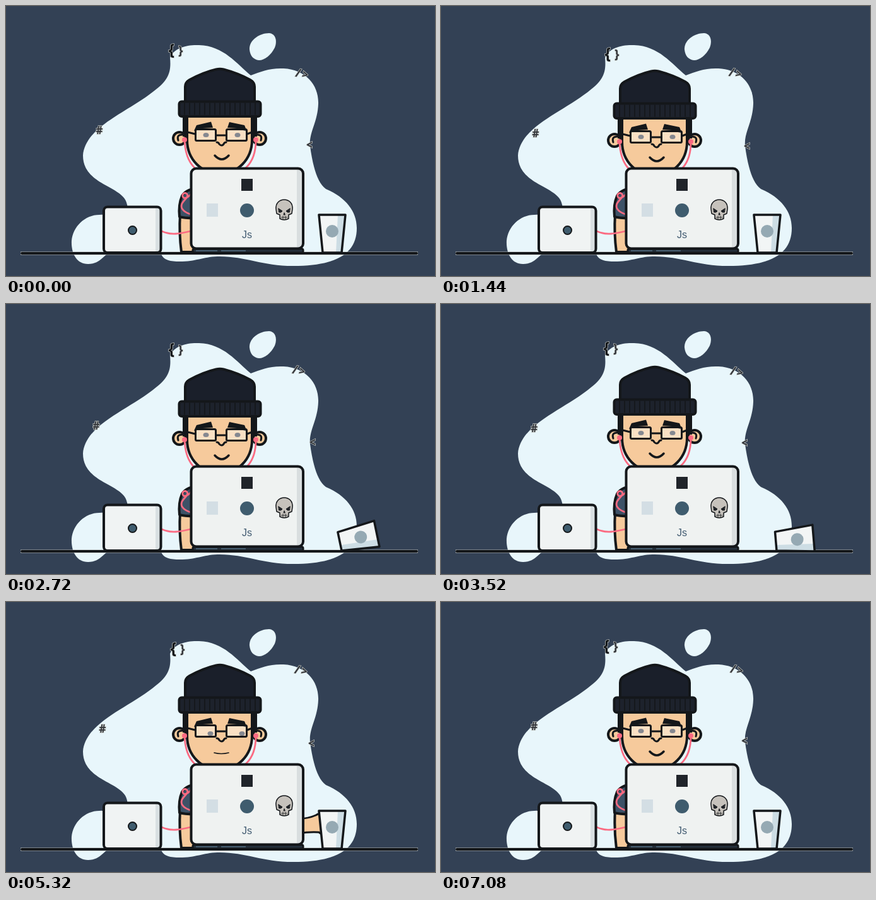
Recreate the animation shown at these times as an HTML page. Size 680 by 428 pixels, loop 7120 ms.

```html
<!DOCTYPE html>
<html lang="en">
<head>
<meta charset="utf-8">
<title>Developer at a desk</title>
<style>
  html, body { margin: 0; width: 100%; height: 100%; overflow: hidden; background: #334155; }
  svg { display: block; width: 680px; height: 428px; }
  .ink { stroke: #14171a; stroke-width: 4; stroke-linejoin: round; stroke-linecap: round; }
  .line { fill: none; }
  .skin { fill: #f6ca9c; }
  .wire { fill: none; stroke: #fb6b82; stroke-width: 2.8; stroke-linecap: round; }
  .code { font: bold 19px "Noto Sans Mono", "DejaVu Sans Mono", monospace; text-anchor: middle; fill: #32353a;
    stroke: #c3c6c2; stroke-width: 1.4; paint-order: stroke; }
</style>
</head>
<body>
<svg viewBox="0 0 680 428">
  <g fill="#e8f6fb">
    <path d="M260 82C266 66 288 61 306 62C345 63 366 92 388 110C404 104 418 98 440 99C476 101 496 126 495 155
      C494 185 480 200 482 222C486 252 493 280 507 290C538 303 556 325 556 352C556 390 528 412 455 412
      C405 412 378 396 335 397C310 398 300 406 270 405C252 404 246 398 246 390L170 389C155 391 152 409 130 409
      C112 409 103 392 104 372C106 350 125 331 148 331C170 331 195 325 192 315C188 285 122 285 122 237
      C126 190 195 168 238 132C258 116 262 104 260 82Z"/>
    <path d="M386 69C385 54 402 43 417 43C428 44 430 56 426 66C420 78 410 86 401 86C392 85 387 79 386 69Z"/>
  </g>

  <g class="code">
    <g id="braces">
      <text x="-7" y="8" style="font-size:25px;fill:#14171a">{</text>
      <text x="8" y="7">}</text>
    </g>
    <g id="hash"><text y="7" style="font-size:18px">#</text></g>
    <g id="close"><text y="7" transform="rotate(14)">/&gt;</text></g>
    <g id="less"><text y="7">&lt;</text></g>
  </g>

  <path d="M23 392H653" stroke="#c3c6c2" stroke-width="5"/>
  <path class="ink line" d="M25 392H651"/>

  <!-- body -->
  <path class="ink skin" d="M276 330Q274 360 278 390H310V330Z"/>
  <path class="ink" fill="#3d5267" d="M310 288Q286 289 279 301Q273 315 275 334Q285 337 310 336Z"/>
  <path class="wire" d="M296 331C284 328 275 322 279 313C283 306 290 303 287 298C284 295 279 297 280 302C282 307 290 304 296 294"/>
  <path class="wire" d="M247 357C262 364 276 361 296 356"/>

  <g id="head">
    <g class="ink skin">
      <circle cx="275" cy="210" r="10"/>
      <circle cx="402" cy="210" r="10"/>
      <path class="line" d="M279 204Q270 204 273 213M398 204Q407 204 404 213" style="stroke-width:3"/>
      <path d="M287 172H390V212C390 244 366 266 339 266C311 266 287 244 287 212Z"/>
    </g>
    <path fill="#14171a" d="M280 174H289V199L284 207H280ZM388 174H398V207H394L388 199Z"/>
    <g class="ink">
      <path fill="#1a1f2a" d="M284 152V128Q284 121 291 117C306 109 322 103 333 100.500Q339 99 345 100.500
        C358 104 374 110 387 117Q394 121 394 128V152Z"/>
      <rect x="274.500" y="151.500" width="129" height="23.500" rx="4" fill="#1d222c"/>
      <path id="ribs" class="line" style="stroke-width:1.6"/>
    </g>
    <path fill="#14171a" d="M298 198L302 189L325 183.500L328 193L312 194ZM354 184L378 189L382 199L366 194L351 193Z"/>
    <path fill="#fff" fill-opacity=".4" d="M301 196H332V213H301ZM350 196H381V213H350Z"/>
    <g id="pupils" fill="#858890">
      <ellipse cx="317" cy="204.500" rx="4.500" ry="3.500"/>
      <ellipse cx="367" cy="204.500" rx="4.500" ry="3.500"/>
    </g>
    <g class="ink line" style="stroke-width:3">
      <rect x="300.500" y="195.500" width="32" height="18" rx="2"/>
      <rect x="349.500" y="195.500" width="32" height="18" rx="2"/>
      <path d="M333 205H349M288 200L300 203M382 203L390 200"/>
      <path d="M334 216Q337 216 338 219Q342 223 345 219Q346 216 349 216"/>
    </g>
    <path id="mouth" class="ink line"/>
    <path class="wire" d="M283 213C284 235 290 252 306 262M396 213C396 235 389 252 373 262"/>
    <circle cx="283" cy="212" r="4" fill="#fb6b82"/>
    <circle cx="396" cy="212" r="4" fill="#fb6b82"/>
  </g>

  <g id="arm" class="ink skin" style="stroke-width:3">
    <path d="M400 362L471 359Q488 358 499 353Q505 349 513 350L525 353Q530 356 527 361Q532 364 529 369
      Q532 373 528 377Q530 383 524 385Q512 387 504 380Q488 379 471 382L400 384Z"/>
    <path class="line" d="M527 361H514Q507 361 507 366M529 369H514M528 377H515M505 353Q511 360 517 360" style="stroke-width:2"/>
  </g>

  <g id="cup">
    <path fill="#f2f5f5" d="M496 331H538L532 391H502Z"/>
    <path fill="#cddde4" d="M526 331H538L532 391H523Z"/>
    <circle cx="517" cy="357" r="10" fill="#95a9b3"/>
    <path class="ink line" d="M496 331H538L532 391H502Z" style="stroke-width:3.5"/>
  </g>

  <!-- large laptop -->
  <rect class="ink" x="296" y="385" width="175" height="6" rx="2" fill="#26323e" style="stroke-width:3"/>
  <path d="M301 388H335M341 388H380" stroke="#4a6274" stroke-width="2"/>
  <rect x="293.500" y="257.500" width="177.500" height="127" rx="8" fill="#eff2f1"/>
  <path fill="#d9dedf" d="M461 258H464Q471 259 471 266V377Q470 384 464 384.500H461Z"/>
  <rect class="ink line" x="293.500" y="257.500" width="177.500" height="127" rx="8"/>
  <rect x="373" y="274" width="18" height="19" fill="#20242a"/>
  <rect x="318" y="313" width="18" height="21" fill="#d3dee4"/>
  <circle cx="382" cy="324" r="11" fill="#3f5c6e"/>
  <text x="382" y="368" text-anchor="middle" font-family="Liberation Sans, Arial, sans-serif" font-size="16" fill="#405a70">Js</text>
  <g class="ink" fill="#c6c2bc" style="stroke-width:1.500">
    <path d="M428 322C427 312 434 307 441 307C448 307 455 312 454 322L453 329L448 331V337Q441 341 434 337V331L429 329Z"/>
    <path fill="#20242a" d="M432 321L438 325L436 327H433ZM450 321L444 325L446 327H449ZM441 328L440 331H442Z" style="stroke-width:1"/>
    <path class="line" d="M436 335H446M439 333V338M443 333V338" style="stroke-width:.8"/>
  </g>

  <!-- small laptop -->
  <rect x="155" y="319" width="90" height="72" rx="6" fill="#f0f3f3"/>
  <path fill="#d9e0e2" d="M237 319H240Q245 320 245 325V386Q244 390 240 391H237Z"/>
  <rect class="ink line" x="155" y="318.500" width="90.500" height="72.500" rx="6"/>
  <circle class="ink" cx="200.500" cy="355.500" r="6.500" fill="#3f5c6e" style="stroke-width:2"/>
</svg>

<script>
const LOOP = 7120, DRIFT = LOOP / 2, BEAT = LOOP / 12;
const $ = id => document.getElementById(id);
const clamp = v => Math.min(1, Math.max(0, v));
const ramp = (t, a, b) => clamp((t - a) / (b - a));
const ease = p => p < .5 ? 2 * p * p : 1 - 2 * (1 - p) ** 2;
const glide = (t, a, b) => ease(ramp(t, a, b));
const set = (id, value) => $(id).setAttribute("transform", value);

// drifting symbols: x, y at the shared phases
const phases = [0, .27, .404, .494, .719, .764, 1];
const drift = {
  braces: [[269, 70], [271, 75], [271, 76], [272, 74], [267, 71], [269, 72], [269, 70]],
  hash: [[148, 196], [148, 200], [150, 201], [153, 200], [144, 193], [143, 192], [148, 196]],
  close: [[469, 107], [465.5, 104], [466.5, 106], [467.5, 108], [464, 106], [464, 105], [469, 107]],
  less: [[481, 220], [486, 221], [485, 222], [484, 224], [486, 221], [486, 219], [481, 220]]
};

$("ribs").setAttribute("d", Array.from({ length: 15 }, (_, i) => `M${283 + i * 8} 154V172`).join(""));

function moveSymbols(t) {
  const p = t % DRIFT / DRIFT;
  const i = phases.findIndex(k => k > p) - 1;
  const f = ramp(p, phases[i], phases[i + 1]);
  for (const id in drift) {
    const [a, b] = [drift[id][i], drift[id][i + 1]];
    set(id, `translate(${a.map((v, k) => v + (b[k] - v) * f)})`);
  }
}

function moveHead(t) {
  const still = t > 6 * BEAT && t < 9 * BEAT;
  const bob = still ? 0 : 3 * clamp(.5 - Math.cos(t / BEAT * 2 * Math.PI));
  const tilt = 2 * (glide(t, 3700, 4000) - glide(t, 4800, 5200));
  set("head", `translate(0 ${bob}) rotate(${tilt} 340 310)`);

  const look = glide(t, 3560, 3720) - glide(t, 5480, 5640);
  set("pupils", `translate(${7 * look} ${4 * look})`);
  const smiling = look < .5;
  $("mouth").setAttribute("d", smiling ? "M331 237Q342 249 353 237" : "M330 239Q341 242 353 239");
  $("mouth").style.strokeWidth = smiling ? 3.5 : 1.6;
}

function moveCup(t) {
  const fall = ramp(t, 2280, 2740) ** 2;
  const lift = glide(t, 4720, 5280);
  set("cup", `rotate(${85.2 * (fall - lift)} 532 391)`);

  const reach = glide(t, 3760, 4280), back = glide(t, 5330, 5680);
  const x = -75 * (1 - reach) - 8 * lift - 67 * back;
  const y = 14 * Math.sin(Math.PI * lift) - 15 * lift + 15 * back;
  set("arm", `translate(${x} ${y})`);
}

const start = performance.now();
function draw() {
  const t = (performance.now() - start) % LOOP;
  moveSymbols(t);
  moveHead(t);
  moveCup(t);
  requestAnimationFrame(draw);
}
draw();
</script>
</body>
</html>
```
